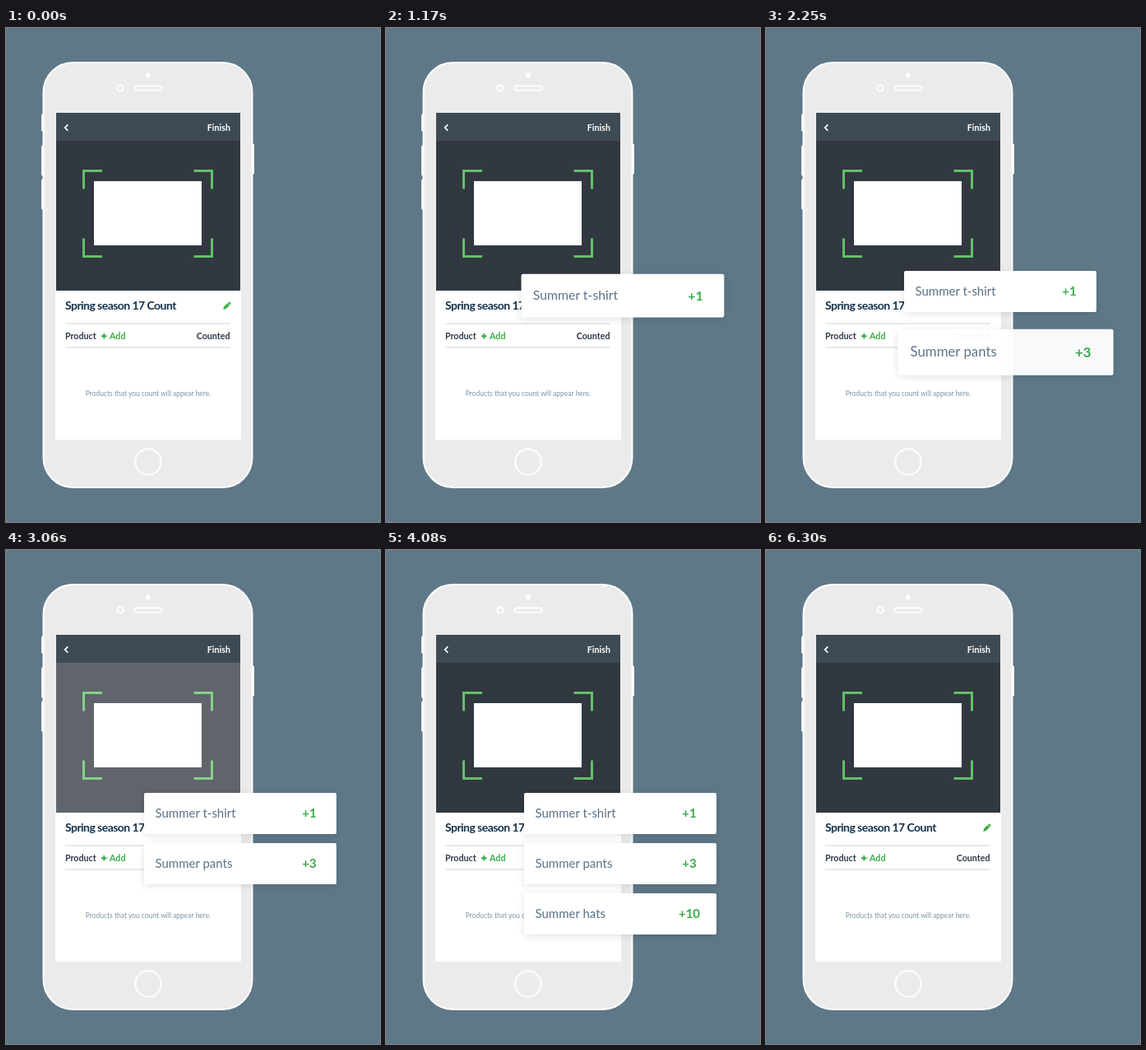
An HTML page for the animation above (6.33 s loop, 455x600 px).

```html
<!DOCTYPE html>
<html lang="en">
<head>
<meta charset="utf-8">
<title>Stock count</title>
<style>
  html, body { margin: 0; width: 100%; height: 100%; overflow: hidden; background: #5f7888; }
  svg { display: block; width: 455px; height: 600px; }
  text { font-family: Lato, "Open Sans", sans-serif; }
  .bold { font-weight: 700; font-size: 10.7px; }
  .outline { fill: none; stroke: #fff; stroke-width: 2; }
  .name { font-size: 15px; fill: #5b7186; }
  .count { font-size: 15px; font-weight: 700; fill: #38ac47; text-anchor: middle; }
</style>
</head>
<body>
<svg viewBox="0 0 455 600">
  <defs>
    <filter id="blur" x="-20%" y="-60%" width="140%" height="220%">
      <feGaussianBlur stdDeviation="5"/>
    </filter>
  </defs>
  <rect width="455" height="600" fill="#5f7888"/>

  <!-- phone -->
  <path d="M44.5 106V124M44.5 144V178M44.5 185V219M300.5 142V176" stroke="#fff" stroke-width="3" stroke-linecap="round"/>
  <rect x="45.5" y="42" width="254" height="516" rx="36" fill="#ebebeb" stroke="#fff" stroke-width="2"/>
  <g class="outline">
    <circle cx="173" cy="57.5" r="2" fill="#fff"/>
    <circle cx="139" cy="73" r="3.6"/>
    <rect x="156" y="70.5" width="34" height="5" rx="2.5"/>
    <circle cx="173" cy="527" r="15.7"/>
  </g>

  <!-- screen -->
  <rect x="60" y="319" width="226" height="181" fill="#fff"/>
  <rect x="61" y="103" width="224" height="34" fill="#3d4a54"/>
  <path d="M75.3 117.3L71.7 121L75.3 124.7" fill="none" stroke="#fff" stroke-width="1.7"/>
  <text class="bold" x="273" y="125" text-anchor="end" fill="#fff">Finish</text>
  <rect x="61" y="137" width="224" height="182" fill="#31383f"/>
  <path d="M94.5 195.5V173.5H117M228.5 173.5H250.5V195.5M94.5 255.5V277.5H117M228.5 277.5H250.5V255.5"
        fill="none" stroke="#62c069" stroke-width="3"/>
  <rect x="107" y="186" width="131" height="78" fill="#fff"/>
  <rect id="flash" x="61" y="137" width="224" height="182" fill="#fff" opacity="0"/>

  <text x="72" y="342" font-size="14" font-weight="700" letter-spacing="-.55" fill="#12314b">Spring season 17 Count</text>
  <g transform="translate(268.5 337.7) rotate(45)" fill="#38ac47">
    <rect x="-1.8" y="-5.8" width="3.6" height="2"/>
    <path d="M-1.8-3.2H1.8V3L0 6L-1.8 3Z"/>
  </g>
  <path d="M72 359H273M72 388H273" stroke="#dfe3e6" stroke-width="1.5"/>
  <text class="bold" x="72" y="377.7" fill="#2d3844">Product</text>
  <path d="M116 374.3H122.6M119.3 371V377.6" stroke="#38ac47" stroke-width="2"/>
  <text class="bold" x="126" y="377.7" fill="#38ac47">Add</text>
  <text class="bold" x="272.5" y="377.7" text-anchor="end" fill="#2d3844">Counted</text>
  <text x="173" y="446.5" font-size="8.5" text-anchor="middle" fill="#7b93a4">Products that you count will appear here.</text>

  <g id="cards"></g>
</svg>
<script>
const LOOP = 6330;
const CENTER_X = 285;
const items = [
  { name: "Summer t-shirt", count: "+1", start: 300, y: 320 },
  { name: "Summer pants", count: "+3", start: 1680, y: 381 },
  { name: "Summer hats", count: "+10", start: 3000, y: 442 }
];
const START = { x: -18.5, y: 49, scale: 0.657 };
const PEAK = { x: 7, y: 12, scale: 1.13 };
const REST = { x: 0, y: 0, scale: 1 };

const flash = document.getElementById("flash");
const cards = document.getElementById("cards");

for (const item of items) {
  item.node = document.createElementNS("http://www.w3.org/2000/svg", "g");
  item.node.innerHTML = `
    <rect x="-117" y="-23" width="234" height="50" fill="#000" opacity=".11" filter="url(#blur)"/>
    <rect x="-117" y="-25" width="234" height="50" rx="2" fill="#fff"/>
    <text class="name" x="-103.5" y="5">${item.name}</text>
    <text class="count" x="84" y="5.3">${item.count}</text>`;
  cards.append(item.node);
}

const mix = (a, b, p) => a + (b - a) * p;

function smooth(t, from, to) {
  const p = Math.min(1, Math.max(0, (t - from) / (to - from)));
  return p * p * (3 - 2 * p);
}

function pose(t) {
  const rise = smooth(t, 360, 590);
  const settle = smooth(t, 600, 1090);
  const at = key => mix(mix(START[key], PEAK[key], rise), REST[key], settle);
  return { x: at("x"), y: at("y"), scale: at("scale") };
}

const flashLevel = t => 0.95 * Math.max(0, 1 - Math.abs(t - 255) / 255);

function draw(time) {
  let glow = 0;
  for (const { node, start, y } of items) {
    const t = time - start;
    const p = pose(t);
    glow = Math.max(glow, flashLevel(t));
    node.setAttribute("transform", `translate(${CENTER_X + p.x} ${y + p.y}) scale(${p.scale})`);
    node.setAttribute("opacity", smooth(t, 360, 600));
  }
  flash.setAttribute("opacity", glow);
  cards.setAttribute("opacity", 1 - smooth(time, 5850, 6300));
}

const origin = performance.now();
function tick() {
  draw((performance.now() - origin) % LOOP);
  requestAnimationFrame(tick);
}
draw(0);
requestAnimationFrame(tick);
</script>
</body>
</html>
```
